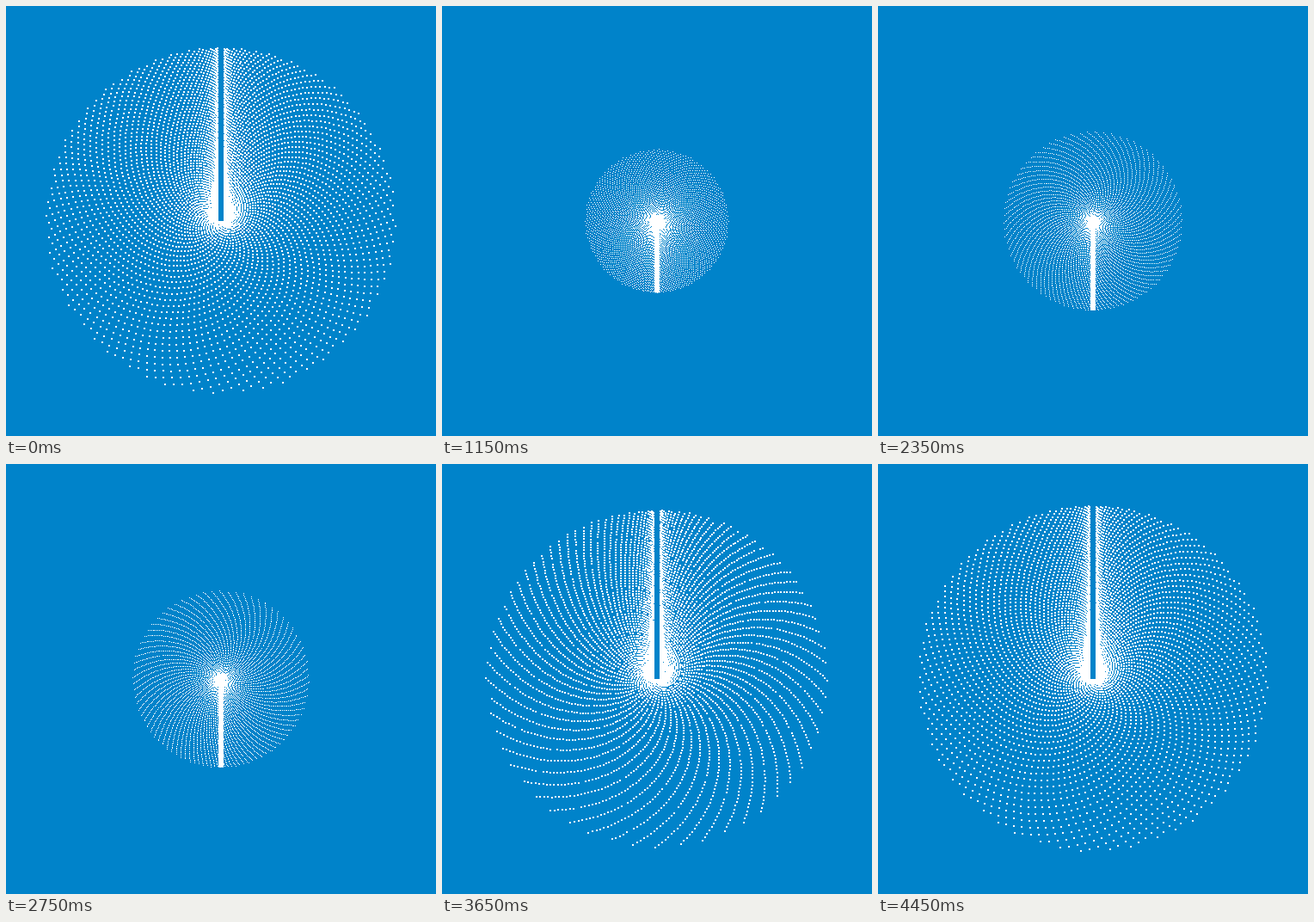
An HTML page with a canvas for the animation above (4500 ms loop, 500 by 500 pixels).

```html
<!DOCTYPE html>
<html>
<head>
<meta charset="utf-8">
<style>
  html, body { margin: 0; height: 100%; overflow: hidden; background: #0083ca; }
  canvas { display: block; }
</style>
</head>
<body>
<canvas id="stage" width="500" height="500"></canvas>
<script>
const ctx = document.getElementById('stage').getContext('2d');
const LOOP = 4500, STEP = 50, COUNT = 6000, SPOKES = 89;
const MID = 250, BIG = 201, SMALL = 104;
const BLUE = '#0083ca', WHITE = '#fff';

const frac = x => x - Math.floor(x);
const ease = (t, from, to) => {
  const x = Math.min(1, Math.max(0, (t - from) / (to - from)));
  return x * x * (3 - 2 * x);
};

// The large burst collapses into the small one and opens again.
const bigScale = t => 1 - ease(t, 120, 1170) + ease(t, 2700, 3750);
const smallScale = t => ease(t, 250, 1510) - ease(t, 2700, 3484);

function dot(x, y, size) {
  ctx.fillRect(Math.round(x - size / 2), Math.round(y - size / 2), size, size);
}

function burst(t, radius, size, power, up, keep) {
  const turn = t / LOOP;
  const twist = 0.3 + 0.2 * Math.cos(2 * Math.PI * (turn - 0.2));
  const pace = 34 / SPOKES + twist / SPOKES / SPOKES;
  ctx.fillStyle = WHITE;
  for (let i = 1; i <= COUNT; i++) {
    if (!keep(frac(i * 0.754878))) continue;
    const s = 2 * frac(i * pace + turn) - 1;
    const angle = Math.PI * Math.sign(s) * Math.abs(s) ** power;
    const r = radius * i / COUNT;
    const gap = up ? 4 * Math.sign(s) * Math.cos(angle / 2) : 0;
    const y = r * Math.cos(angle);
    dot(MID + gap + r * Math.sin(angle), up ? MID - y : MID + y, size);
  }
}

function draw(t) {
  const big = bigScale(t), small = smallScale(t);
  ctx.fillStyle = BLUE;
  ctx.fillRect(0, 0, 500, 500);
  if (big > 0) {
    const r = BIG * big;
    burst(t, r, big > 0.6 ? 2 : 1.5, 2, true, h => h < big);
    ctx.fillStyle = BLUE;
    ctx.fillRect(MID - 3, MID - r - 1, 6, r + 1);
  }
  if (small > 0) {
    const r = SMALL * small;
    burst(t, r, 1, 1.3, false, h => h >= big);
    ctx.fillRect(MID - 3, MID, 6, r);
  }
}

const start = performance.now();
function tick(now) {
  const t = Math.max(0, now - start) % LOOP;
  draw(Math.floor(t / STEP) * STEP);
  requestAnimationFrame(tick);
}
draw(0);
requestAnimationFrame(tick);
</script>
</body>
</html>
```
